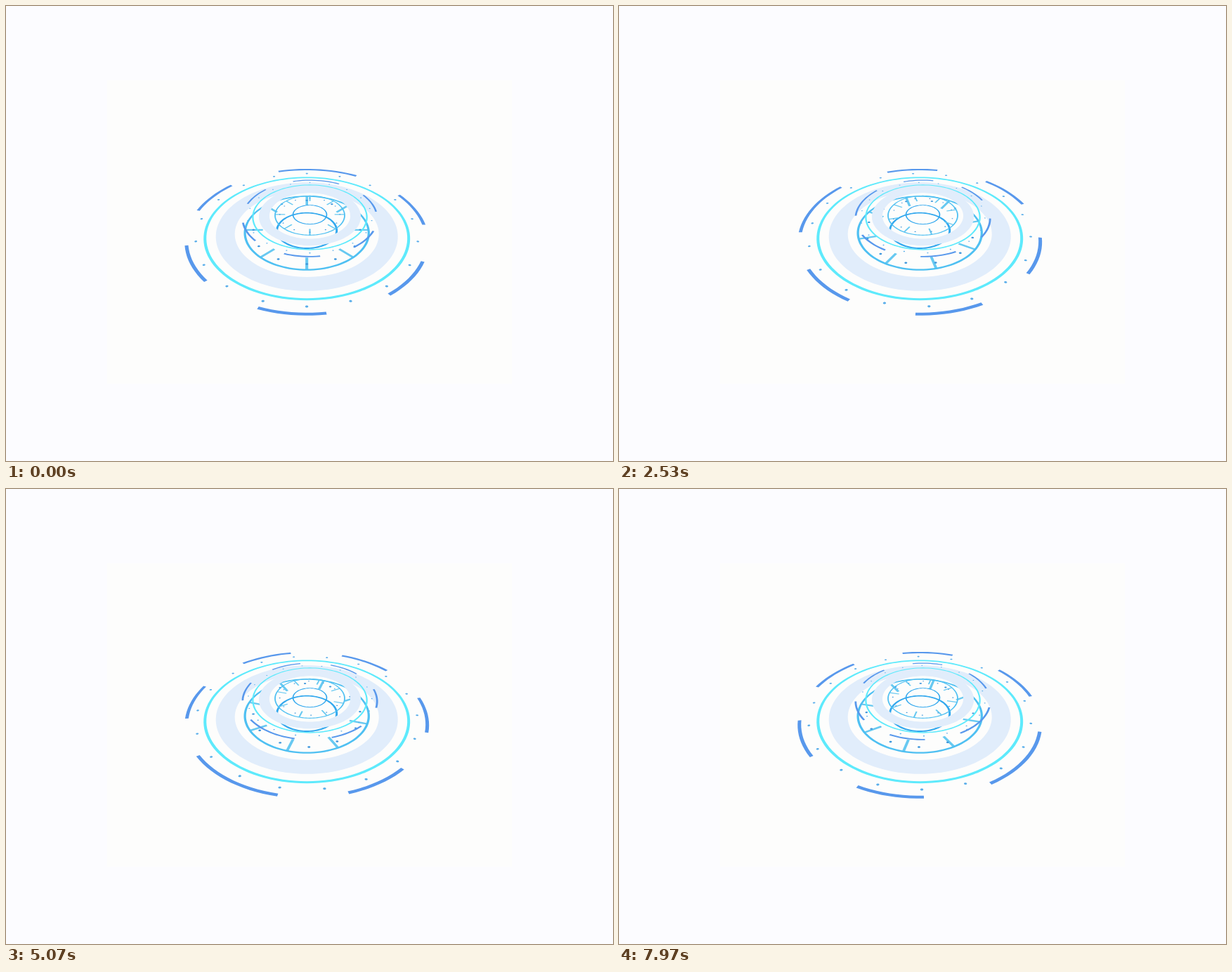
Animation, 864 px wide and 648 px high, one loop 8000 ms. Source, as an HTML page:

```html
<!DOCTYPE html>
<html lang="en">
<head>
<meta charset="utf-8">
<title>Rotating dial</title>
<style>
  html, body { margin: 0; width: 100%; height: 100%; overflow: hidden; background: #fcfcff; }
  svg { display: block; width: 100vw; height: 100vh; }
</style>
</head>
<body>
<svg id="stage" viewBox="0 0 864 648">
  <rect x="144" y="106" width="576" height="432" fill="#fdfdfc"/>
</svg>
<script>
const LOOP = 8000;
const SPEED = 30; // degrees per second
const RAD = Math.PI / 180;
const stage = document.getElementById('stage');

// Each dial lies on a tilted plane: size, screen centre, vertical squash, perspective.
const views = [
  { size: 1, cx: 428.2, cy: 318.8, tilt: 0.592, depth: 0.00098 },
  { size: 0.563, cx: 432.5, cy: 296.8, tilt: 0.565, depth: 0.0011 }
];

const range = (n, fn) => Array.from({ length: n }, (_, i) => fn(i));

// Angles run clockwise from the right-hand side.
const polar = (r, deg) => [r * Math.cos(deg * RAD), r * Math.sin(deg * RAD)];

function project(v, [x, y]) {
  x *= v.size;
  y *= v.size;
  const p = 1 / (1 - v.depth * y);
  return (v.cx + x * p).toFixed(2) + ' ' + (v.cy + y * v.tilt * p).toFixed(2);
}

const polygon = (v, points) => 'M' + points.map(p => project(v, p)).join('L') + 'Z';

function edge(r, from, to) {
  const n = Math.ceil(Math.abs(to - from) / 3);
  return range(n + 1, i => polar(r, from + (to - from) * i / n));
}

const ring = (v, r0, r1) => polygon(v, edge(r1, 0, 360)) + polygon(v, edge(r0, 360, 0));

const sector = (v, r0, r1, from, to) =>
  polygon(v, [...edge(r1, from, to), ...edge(r0, to, from)]);

function arcs(v, turn) {
  const gap = 29, short = 28.3, long = 44.5;
  let d = '', a = 254 + turn;
  for (let i = 0; i < 6; i++) {
    const span = i ? short : long;
    d += sector(v, 166.7, 171.5, a, a + span);
    a += span + gap;
  }
  return d;
}

function dots(v, count, r, size, turn) {
  return range(count, i => {
    const [x, y] = polar(r, 90 + turn + i * 360 / count);
    return polygon(v, range(10, k => {
      const [dx, dy] = polar(size, k * 36);
      return [x + dx, y + dy];
    }));
  }).join('');
}

function ticks(v, turn) {
  const half = 1.9;
  return range(8, i => {
    const a = 90 + turn + i * 45;
    const [c, s] = polar(1, a);
    const at = (r, w) => [r * c - w * s, r * s + w * c];
    return polygon(v, [at(62.5, -half), at(87, -half), at(87, half), at(62.5, half)]);
  }).join('');
}

function addPath(fill) {
  const path = document.createElementNS('http://www.w3.org/2000/svg', 'path');
  path.setAttribute('fill', fill);
  path.setAttribute('fill-rule', 'evenodd');
  stage.appendChild(path);
  return path;
}

const moving = [];

function addRing(v, fill, r0, r1) {
  addPath(fill).setAttribute('d', ring(v, r0, r1));
}

function addMoving(fill, shape) {
  moving.push({ path: addPath(fill), shape });
}

for (const v of views) {
  addRing(v, '#e1edfb', 102, 128.5);
  addRing(v, '#5eeafc', 141.6, 145.5);
  addMoving('#68c9f1', a => ticks(v, a));
  addRing(v, '#4fc0f2', 86.2, 89.4);
  addRing(v, '#32a8ee', 41, 44);
  addMoving('#3f97dc', a => dots(v, 12, 76, 1.9, -a));
  addMoving('#5aaeea', a => dots(v, 18, 156.2, 1.9, a));
  addMoving('#5898ec', a => arcs(v, -a));
}

function draw(ms) {
  const angle = SPEED * ms / 1000;
  for (const { path, shape } of moving) path.setAttribute('d', shape(angle));
}

const start = performance.now();

function tick() {
  draw((performance.now() - start) % LOOP);
  requestAnimationFrame(tick);
}

tick();
</script>
</body>
</html>
```
